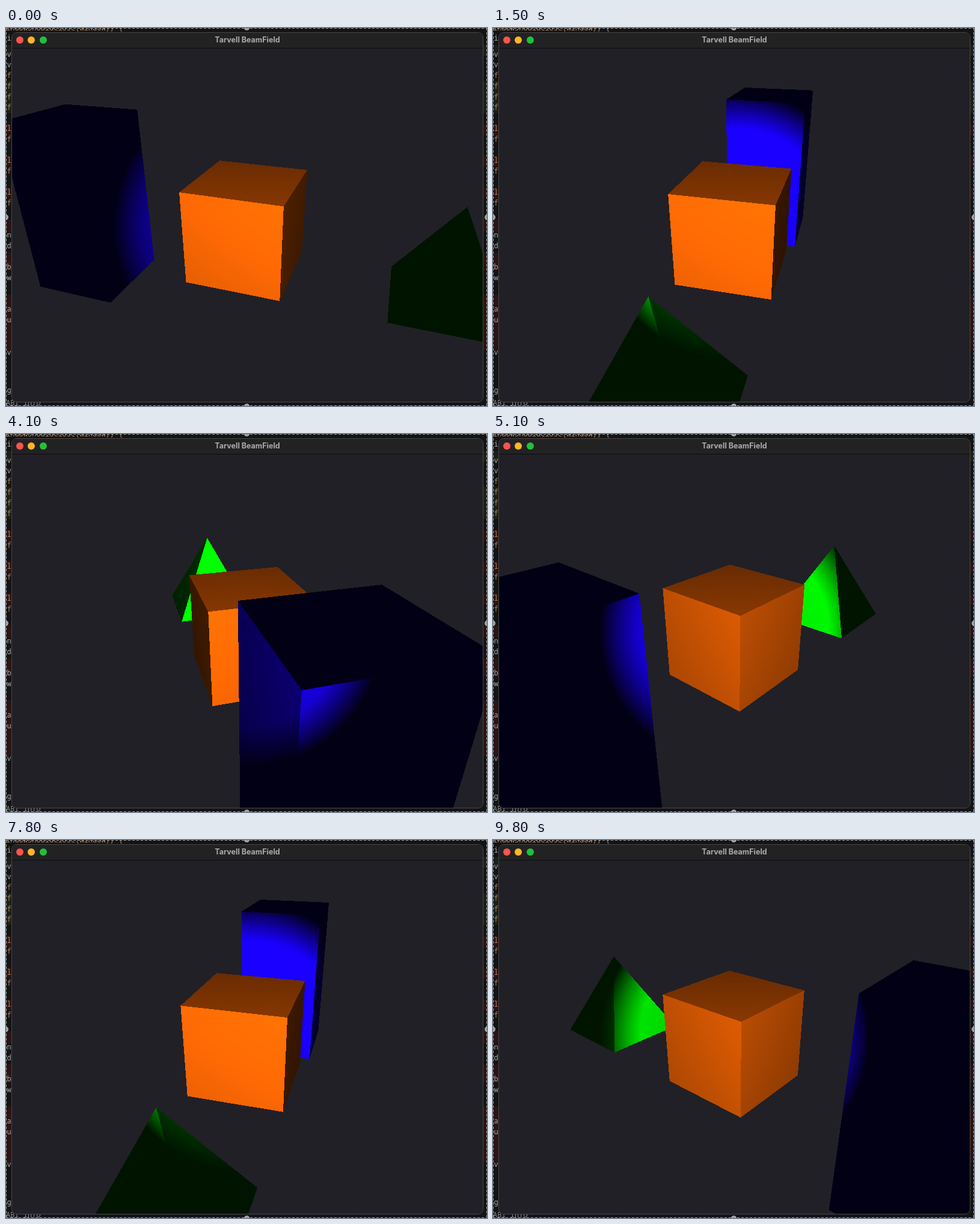
These frames come from a looping animation (800 px wide and 628 px high, 9900 ms). An HTML page with a canvas:

```html
<!DOCTYPE html>
<html lang="en">
<head>
<meta charset="utf-8">
<title>Spot light scene</title>
<style>
  html, body { margin: 0; width: 100%; height: 100%; overflow: hidden; background: #141416; }
  #stage { position: absolute; left: 0; top: 0; width: 800px; height: 628px; overflow: hidden; background: #141416; }
  #stage * { position: absolute; box-sizing: border-box; }
  .code { font: 12px/16px "Noto Sans Mono", monospace; white-space: pre; }
  .band { left: 0; width: 800px; }
  #win { left: 9px; top: 7px; width: 785px; height: 615px; border: 1px solid #47474b; border-radius: 9px; background: #212026; overflow: hidden; }
  #bar { left: 0; top: 0; width: 783px; height: 26px; background: #222223; border-bottom: 1px solid #0c0c0e; }
  #title { left: 0; top: 0; width: 100%; text-align: center; color: #acacae; font: 700 12.5px/23px Inter, sans-serif; }
  .dot { top: 5.5px; width: 12px; height: 12px; border-radius: 50%; }
  canvas { left: 0; top: 26px; }
  .h { left: 0; width: 800px; height: 1px; background: repeating-linear-gradient(90deg, #a0a0a0 0 4px, #1a1a1a 4px 7px); }
  .v { top: 0; width: 1px; height: 628px; background: repeating-linear-gradient(#a0a0a0 0 4px, #1a1a1a 4px 7px); }
  .grip { width: 9px; height: 9px; border-radius: 50%; background: #98989a; border: 1px solid #c4c4c4; }
</style>
</head>
<body>
<div id="stage">
  <div id="editor"></div>
  <div id="win">
    <div id="bar">
      <div id="title">Tarvell BeamField</div>
      <i class="dot" style="left:6.5px;background:#ff544b"></i>
      <i class="dot" style="left:26px;background:#ffb429"></i>
      <i class="dot" style="left:46px;background:#21c03c"></i>
    </div>
    <canvas id="view" width="783" height="587"></canvas>
  </div>
  <i class="h" style="top:0"></i><i class="h" style="top:627px"></i>
  <i class="v" style="left:0"></i><i class="v" style="left:799px"></i>
  <i class="grip" style="left:396px;top:-5px"></i><i class="grip" style="left:396px;top:624px"></i>
  <i class="grip" style="left:-5px;top:310px"></i><i class="grip" style="left:796px;top:310px"></i>
</div>
<script>
// Editor slivers around the window
const editor = document.getElementById('editor');
function add(cls, css, text = '') {
  const el = document.createElement('div');
  el.className = cls;
  el.style.cssText = css;
  el.textContent = text;
  editor.append(el);
}
const bands = { '#1b2118': [[28, 18], [88, 53]], '#2c1414': [[160, 18], [212, 18], [265, 18], [318, 20], [373, 30], [443, 92]] };
for (const [color, list] of Object.entries(bands))
  for (const [y, h] of list) add('band', `top:${y}px;height:${h}px;background:${color}`);
const glyphs = [[18, 'i'], [45, 'v'], [62, 'v'], [80, 'f'], [98, 'f'], [116, 'f'], [133, 'f'], [168, 'l'], [186, 'f'],
  [221, 'l'], [239, 'f'], [274, 'l'], [292, 'f'], [345, 'n'], [363, 'd'], [398, 'b'], [416, 'w'], [468, 'a'], [486, 'u'], [540, 'v'], [603, 'g']];
for (const [y, ch] of glyphs)
  add('code', `left:1.5px;top:${y - 9}px;color:${'fl'.includes(ch) ? '#b5804f' : '#a8a8a8'}`, ch);
add('code', 'left:0;top:-8px;color:#c58a58', 'indowShouldClose(window)) {');
add('code', 'left:0;top:615px;color:#8c8c8c', 'ABI info');

// Scene: the viewer circles the solids and carries the spot light
const W = 783, H = 587, CX = 391.5, CY = 294, F = 710;
const DIST = Math.hypot(2, 4), SIN = 2 / DIST, COS = 4 / DIST;
const rad = d => d * Math.PI / 180;
const INNER = Math.cos(rad(12.5)), OUTER = Math.cos(rad(17.5));
const LOOP = 9900, STEP = 100, START = rad(18.75);

const ring = [[-.5, .5], [.5, .5], [.5, -.5], [-.5, -.5]];

// gains: how strongly the front, right, back, left and top faces take light
function solid(x, half, taper, color, ambient, gains) {
  const top = ([a, b]) => [x + a * taper, half, b * taper];
  const low = ([a, b]) => [x + a, -half, b];
  const faces = ring.map((a, i) => {
    const b = ring[(i + 1) % 4];
    return { pts: [top(a), top(b), low(b), low(a)], n: [a[0] + b[0], 0, a[1] + b[1]], gain: gains[i] };
  });
  if (taper) faces.push({ pts: ring.map(top), n: [0, 1, 0], gain: gains[4] });
  return { x, faces, color, ambient };
}

const solids = [
  solid(0, .5, 1, [255, 105, 4], .06, [1.15, 1.15, 1.15, 1.15, 1.15]),
  solid(-2, 1, 1, [26, 0, 262], .08, [1, 1, 1, 1, 0]),
  solid(2, .5, 0, [0, 255, 0], .08, [0, 1.1, .5, 1.1])
];

const ctx = document.getElementById('view').getContext('2d');
const img = ctx.createImageData(W, H);
const px = img.data, words = new Uint32Array(px.buffer);

// View space: x right, y down, z away from the eye
function turn([x, y, z], a, dist) {
  const c = Math.cos(a), s = Math.sin(a);
  const X = x * c - z * s, Z = z * c + x * s;
  return [X, Z * SIN - y * COS, dist - y * SIN - Z * COS];
}

const dot = (a, b) => a[0] * b[0] + a[1] * b[1] + a[2] * b[2];

function fillFace(face, solid, angle) {
  const pts = face.pts.map(p => turn(p, angle, DIST));
  const n = turn(face.n, angle, 0);
  const flat = pts.map(([x, y, z]) => [CX + F * x / z, CY + F * y / z]);
  // Clockwise outlines on screen face the viewer
  const area = flat.reduce((sum, p, i) => {
    const q = flat[(i + 1) % 4];
    return sum + p[0] * q[1] - q[0] * p[1];
  }, 0);
  const towards = face.n[1] ? dot(n, pts[0]) < 0 : area > 0;
  if (!towards) return;
  const ys = flat.map(p => p[1]);
  const y0 = Math.max(0, Math.ceil(Math.min(...ys) - .5));
  const y1 = Math.min(H, Math.ceil(Math.max(...ys) - .5));
  const [r, g, b] = solid.color;
  for (let y = y0; y < y1; y++) {
    const cy = y + .5;
    let lo = Infinity, hi = -Infinity;
    flat.forEach((p, i) => {
      const q = flat[(i + 1) % 4];
      if (p[1] <= cy === q[1] <= cy) return;
      const x = p[0] + (q[0] - p[0]) * (cy - p[1]) / (q[1] - p[1]);
      lo = Math.min(lo, x);
      hi = Math.max(hi, x);
    });
    const x0 = Math.max(0, Math.ceil(lo - .5)), x1 = Math.min(W, Math.ceil(hi - .5));
    const v = cy - CY;
    for (let x = x0; x < x1; x++) {
      const u = x + .5 - CX, len = Math.sqrt(u * u + v * v + F * F);
      const spot = Math.min(1, Math.max(0, (F / len - OUTER) / (INNER - OUTER)));
      const facing = Math.max(0, -(n[0] * u + n[1] * v + n[2] * F) / len);
      const k = solid.ambient + face.gain * facing * spot;
      const o = (y * W + x) * 4;
      px[o] = r * k;
      px[o + 1] = g * k;
      px[o + 2] = b * k;
    }
  }
}

function draw(seconds) {
  const angle = seconds + START, eye = 4 * Math.sin(angle);
  words.fill(0xff262021);
  // Solids stand in a row, so distance along it gives the paint order
  [...solids].sort((a, b) => Math.abs(b.x - eye) - Math.abs(a.x - eye))
    .forEach(s => s.faces.forEach(f => fillFace(f, s, angle)));
  ctx.putImageData(img, 0, 0);
}

const begin = performance.now();
let shown = -1;
function tick() {
  const step = Math.floor((performance.now() - begin) % LOOP / STEP);
  if (step !== shown) draw((shown = step) * STEP / 1000);
  requestAnimationFrame(tick);
}
tick();
</script>
</body>
</html>
```
